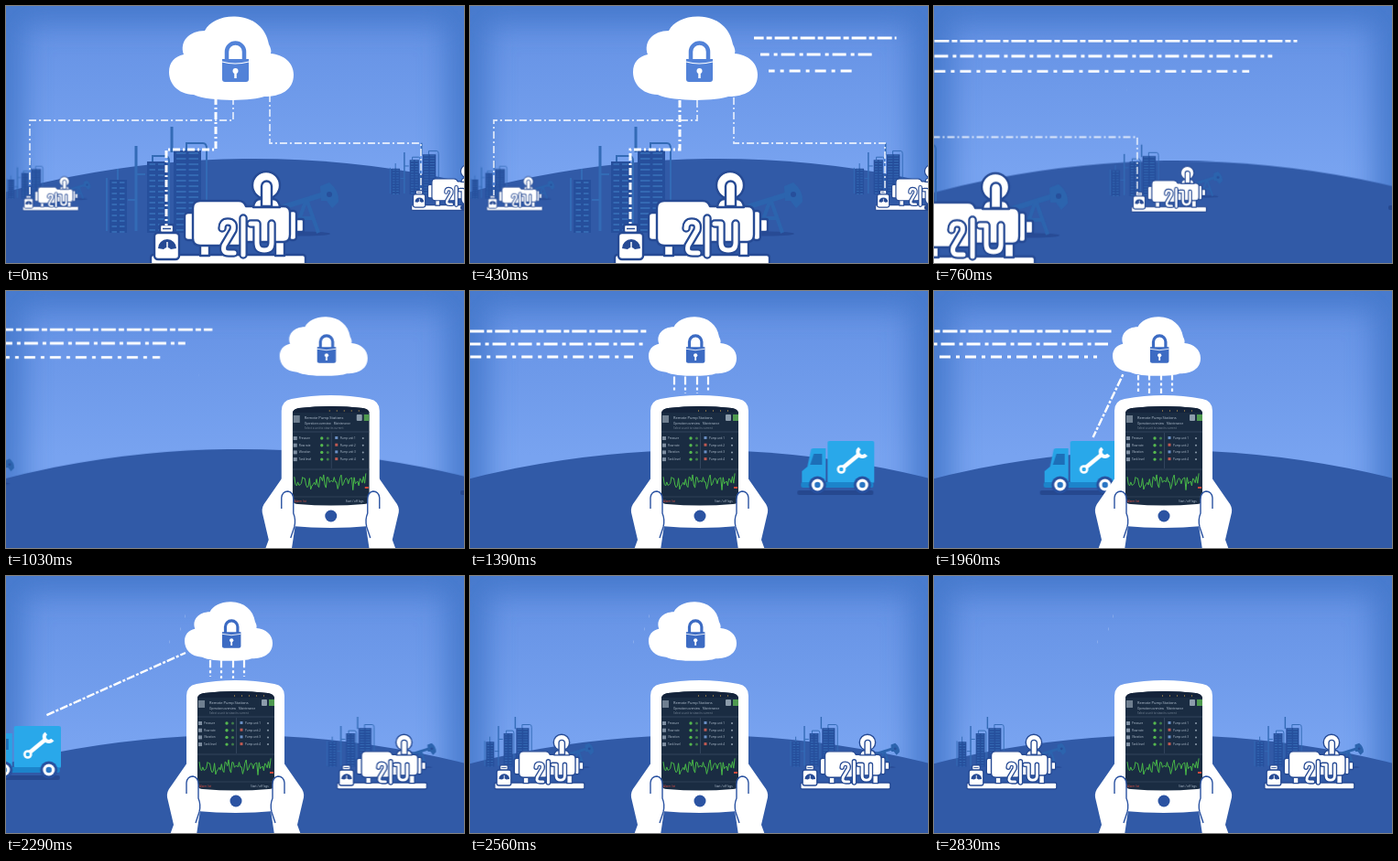
Animation, 500 px wide and 281 px high, one loop 2860 ms. Source, as an HTML page:

```html
<!DOCTYPE html>
<html lang="en">
<head>
<meta charset="utf-8">
<title>Connected pumps</title>
<style>
html, body { margin: 0; width: 100%; height: 100%; overflow: hidden; background: #5585db; }
svg { display: block; width: 100%; height: 100%; }
text { font-family: "Open Sans", Arial, sans-serif; fill: #b9c7d6; font-size: 3px; }

.pan, .arrive, .truck, .lift, .site-r, .site-l,
.wire, .data, .rain, .call { animation: 2860ms linear infinite; }

/* camera pan: layers share one ease and differ in distance */
.pan { animation-name: pan; }
.near { --shift: -613px, 5px; }
.mid { --shift: -642px, 5px; }
.cloud-a { --shift: -955px, 0px; }
.hill { --shift: -20px, 7px; }
.arrive { animation-name: arrive; }
@keyframes pan {
  0%, 15.38% { transform: translate(0px, 0px); animation-timing-function: cubic-bezier(.333,0,.667,1); }
  43.36%, 100% { transform: translate(var(--shift)); }
}
@keyframes arrive {
  0%, 15.38% { transform: translateX(613px); animation-timing-function: cubic-bezier(.333,0,.667,1); }
  43.36%, 100% { transform: none; }
}

/* dashed links from the sites to the cloud */
.wire, .data, .rain, .call { fill: none; stroke: #fff; }
.wire { stroke-width: 1.8; stroke-dasharray: 8 3 2 3; opacity: .75; }
.w1 { animation-name: w1, flow-up; }
.w2 { animation-name: w2, flow-up; stroke-width: 3; opacity: 1; }
.w3 { animation-name: w3, flow-up; }
@keyframes flow-up { to { stroke-dashoffset: 192px; } }
@keyframes w1 {
  0%, 15.38% { d: path("M248 100V125H26V207"); animation-timing-function: cubic-bezier(.333,0,.667,1); }
  43.36%, 100% { d: path("M-94 100V125H26V207"); }
}
@keyframes w2 {
  0%, 15.38% { d: path("M229 100V157H175V240"); animation-timing-function: cubic-bezier(.333,0,.667,1); }
  43.36%, 100% { d: path("M-113 100V157H175V240"); }
}
@keyframes w3 {
  0%, 15.38% { d: path("M288 97V150H453V204"); animation-timing-function: cubic-bezier(.333,0,.667,1); }
  43.36%, 100% { d: path("M-25 97V126H442V204"); }
}

/* data streams between the two clouds */
.data { stroke-width: 2.8; }
.d1 { animation-name: d1, flow; stroke-dasharray: 16 3 6 3; }
.d2 { animation-name: d2, flow; stroke-dasharray: 15 5 4 4; }
.d3 { animation-name: d3, flow; stroke-dasharray: 12 6 4 6; }
@keyframes flow { to { stroke-dashoffset: -336px; } }
@keyframes d1 {
  0%, 2.94% { d: path("M310 35H310"); }
  15.38% { d: path("M310 35H469.5"); }
  24% { d: path("M100 36H580"); }
  41.78% { d: path("M100 39H808"); }
  69.93% { d: path("M613 39H808"); }
  76.92%, 100% { d: path("M808 39H808"); }
}
@keyframes d2 {
  0%, 5.17% { d: path("M317 53H317"); }
  15.38% { d: path("M317 53H445"); }
  24% { d: path("M100 53H553.5"); }
  43.85% { d: path("M100 53H803"); }
  69.93% { d: path("M613 53H803"); }
  76.92%, 100% { d: path("M803 53H803"); }
}
@keyframes d3 {
  0%, 7.48% { d: path("M326 71H326"); }
  15.38% { d: path("M326 71H423"); }
  24% { d: path("M100 70H529"); }
  45.28% { d: path("M100 67H791"); }
  69.93% { d: path("M613 67H791"); }
  76.92%, 100% { d: path("M791 67H791"); }
}

/* cloud to tablet */
.rain { animation-name: rain, flow; stroke-width: 2.2; stroke-dasharray: 9 3 3 3; }
@keyframes rain {
  0%, 44.5% { d: path("M223 92V92M235 92V92M248 92V92M260 92V92"); }
  48.5%, 83.92% { d: path("M223 92V110M235 92V112M248 92V112M260 92V110"); }
  88.11%, 100% { d: path("M223 110V110M235 112V112M248 112V112M260 110V110"); }
}
.lift { animation-name: lift; }
@keyframes lift {
  0%, 89.51% { transform: none; animation-timing-function: cubic-bezier(.333,0,.667,.333); }
  98.95%, 100% { transform: translateY(-96px); }
}

/* service truck and its link */
.truck { animation-name: drive; }
@keyframes drive {
  0%, 37.2% { transform: translateX(500px); }
  85.03%, 100% { transform: translateX(-80px); }
}
.call { animation-name: call, flow; stroke-width: 2.4; stroke-dasharray: 9 2 3 2; }
@keyframes call {
  0%, 64.69% { d: path("M210 92L210 92"); }
  67.48% { d: path("M208 91L186 161"); }
  68.53% { d: path("M207 90L174 160"); }
  80.07% { d: path("M196 84L43 153"); }
  84.97% { d: path("M190 81L-13 150"); }
  87%, 100% { d: path("M-13 150L-13 150"); }
}

/* closing pair of sites */
.site-r { animation-name: site-r; }
.site-l { animation-name: site-l; }
@keyframes site-r {
  0%, 72.73% { transform: translateX(165px); animation-timing-function: cubic-bezier(.2,.7,.3,1); }
  81.12%, 100% { transform: none; }
}
@keyframes site-l {
  0%, 84.62% { transform: translateX(-165px); animation-timing-function: cubic-bezier(.2,.7,.3,1); }
  93.01%, 100% { transform: none; }
}
</style>
</head>
<body>
<svg viewBox="0 0 500 281" preserveAspectRatio="none">
  <defs>
    <linearGradient id="sky" gradientUnits="userSpaceOnUse" x1="0" y1="0" x2="0" y2="180">
      <stop offset="0" stop-color="#6390e3"/>
      <stop offset="1" stop-color="#78a3f0"/>
    </linearGradient>
    <filter id="soft" x="-.2" y="-.2" width="1.4" height="1.4"><feGaussianBlur stdDeviation="15"/></filter>

    <g id="cloud">
      <path fill="#fff" d="M205 97C187 96 178 85 178 72C178 62 184 55 194 53C189 39 200 27 217 27C222 17 235 11 250 11.500C270 12 284 24 287 42C289 46 290 49 289 52C303 53 314 62 314 75C314 92 300 99 282 99C270 104 222 105 205 97Z"/>
      <g fill="currentColor">
        <path fill="none" stroke="currentColor" stroke-width="4.500" d="M241 59V50a9.500 9.500 0 0 1 19 0V59"/>
        <path d="M236 58H265V80Q265 83 262 83H239Q236 83 236 80Z"/>
      </g>
      <path fill="none" stroke="#fff" stroke-width="1.200" d="M236 61Q250 65 265 61"/>
      <circle cx="250.500" cy="71" r="3" fill="#fff"/>
      <path stroke="#fff" stroke-width="2.500" d="M250.500 72V79"/>
    </g>

    <g id="plant">
      <ellipse cx="325" cy="249" rx="29" ry="2.500" fill="#284b95"/>
      <g fill="none" stroke="#336bb6" stroke-width="2">
        <path stroke-width="3" d="M181 132V160M142 153V246"/>
        <path d="M122 178V192M110 188V246"/>
        <path d="M197 158V150H215Q219 150 219 156V246M160 170V164H174Q178 164 178 170V246M143 184H152M133 212H143"/>
      </g>
      <path fill="#264f9c" d="M183 158H213V248H183ZM154 170H175V248H154ZM113 190H132V248H113Z"/>
      <g fill="none" stroke="#3469b3" stroke-dasharray="2 4">
        <path stroke-width="24" d="M198 160V248"/>
        <path stroke-width="16" d="M164.500 172V248"/>
        <path stroke-width="14" d="M122.500 192V248"/>
      </g>
      <path stroke="#264f9c" stroke-width="3" d="M198 158V248M164.500 170V248M122.500 190V248"/>
      <g fill="none" stroke="#2c64ae" stroke-linejoin="round">
        <path stroke-width="6" d="M302 220L350 205"/>
        <path stroke-width="4" d="M328 211L315 248M328 211L341 248M321 232H336"/>
      </g>
      <path fill="#2c64ae" d="M343 197L353 193Q364 202 363 214L356 221L350 213H344Z"/>
      <circle cx="353" cy="206" r="3" fill="#274f9b"/>
    </g>

    <g id="pump" fill="#fff" stroke="#264a94" stroke-width="2.400" stroke-linejoin="round">
      <rect x="158" y="272" width="169" height="12" rx="3"/>
      <path d="M212 256H222V273H212ZM294 256H304V273H294Z"/>
      <rect x="168" y="239" width="15" height="9" rx="2"/>
      <path fill="none" stroke-width="1.500" d="M171 243.500H180"/>
      <rect x="162" y="248" width="27" height="29" rx="4"/>
      <path fill="#264a94" stroke="none" d="M166 265A10 10 0 0 1 186 265L180 266Q176 262 172 266Z"/>
      <path stroke="#fff" stroke-width="1.500" d="M176 265V258"/>
      <rect x="316" y="233" width="9" height="14" rx="2"/>
      <rect x="309" y="224" width="8" height="32" rx="3"/>
      <rect x="195" y="226" width="14" height="30" rx="4"/>
      <path d="M212 213H254Q260 213 262 219H303Q310 219 310 226V250Q310 258 303 258H262Q258 262 252 262H212Q204 262 204 254V221Q204 213 212 213Z"/>
      <circle cx="284" cy="196" r="15"/>
      <path d="M270 220Q271 211 278 211H291Q298 211 299 220Z"/>
      <path d="M279 219V197a5.500 5.500 0 0 1 11 0V219Z"/>
      <g fill="none" stroke-linecap="round">
        <path id="pipes" stroke-width="9.500" d="M236 243Q236 236 242 236Q250 236 248 245L238 262Q236 270 243 270H249M259 232V272M267 238H274V259Q274 267 282 267Q290 267 290 259V238"/>
        <path stroke="#fff" stroke-width="5" d="M236 243Q236 236 242 236Q250 236 248 245L238 262Q236 270 243 270H249M259 232V272M267 238H274V259Q274 267 282 267Q290 267 290 259V238"/>
      </g>
    </g>

    <g id="site"><use href="#plant"/><use href="#pump"/></g>
    <g id="far-site">
      <use href="#plant" transform="translate(-26.700 92) scale(.47)"/>
      <use href="#pump" transform="translate(-55.800 68.300) scale(.58)"/>
    </g>

    <g id="hand">
      <path fill="#fff" d="M198 204L180 230Q175 236 176 242L183 272L179 283H208L212 256Z"/>
      <path fill="#fff" stroke="#2b53a2" stroke-width="1.400" d="M197 238V226Q198 219 204 219Q210 220 210 228V243Q213 250 211 258L207 270"/>
    </g>

    <clipPath id="glass"><path d="M209 133Q210 129 216 128Q251 124 286 128Q292 129 293 133V229Q292 233 287 233Q251 236 215 233Q210 233 209 229Z"/></clipPath>
  </defs>

  <rect width="500" height="281" fill="url(#sky)"/>
  <rect x="-5" y="-5" width="510" height="291" fill="none" stroke="#3f74c8" stroke-width="50" opacity=".8" filter="url(#soft)"/>
  <g class="pan hill"><circle cx="271" cy="1197" r="1030" fill="#315aa7"/></g>

  <g class="site-l"><use href="#far-site"/></g>
  <g class="site-r"><use href="#far-site" x="325"/></g>

  <g class="pan mid">
    <use href="#site" transform="translate(366 85.700) scale(.485)"/>
    <path class="wire w3"/>
  </g>
  <g class="pan near">
    <use href="#site" transform="translate(-38.600 121.300) scale(.36)"/>
    <use href="#site"/>
    <path class="wire w1"/>
    <path class="wire w2"/>
    <path class="data d1"/>
    <path class="data d2"/>
    <path class="data d3"/>
  </g>
  <g class="pan cloud-a" color="#5282d8"><use href="#cloud"/></g>

  <g class="truck">
    <rect x="-4" y="218" width="83" height="5" rx="2" fill="#26488f"/>
    <path fill="#27a4e6" d="M11 173Q12 172 14 172H27V212H1V197L7 192Z"/>
    <path fill="#1d6fb8" d="M14 178H23V190H10Z"/>
    <rect x="29" y="164" width="51" height="46" rx="2" fill="#29a8ea"/>
    <rect x="0" y="209" width="79" height="6" rx="2" fill="#1c84cb"/>
    <g stroke="#fff" fill="none">
      <path stroke-width="4.500" d="M46 193L63 179"/>
      <circle cx="44" cy="195" r="3.500" stroke-width="2.600"/>
      <path stroke-width="4" d="M64 172A5 5 0 1 0 71 179"/>
    </g>
    <g id="wheel">
      <circle cx="18" cy="212" r="9.500" fill="#27509f"/>
      <circle cx="18" cy="212" r="6.500" fill="#fff"/>
      <circle cx="18" cy="212" r="3.200" fill="#2a76c4"/>
    </g>
    <use href="#wheel" x="49"/>
  </g>

  <path class="call"/>

  <g class="arrive">
    <path class="rain"/>
    <g class="lift" color="#3c6bc3"><use href="#cloud" transform="translate(69.300 20.200) scale(.706)"/></g>
    <path fill="#fff" d="M197 131Q197 120 208 118Q251 110 293 118Q304 120 304 131V248Q303 256 293 257Q251 261 208 257Q198 256 197 248Z"/>
    <g clip-path="url(#glass)">
      <rect x="208" y="124" width="86" height="112" fill="#1a2c42"/>
      <rect x="208" y="124" width="86" height="9" fill="#14233a"/>
      <path stroke="#e0b050" stroke-width="1" stroke-dasharray="1 7" d="M249 131H285"/>
      <rect x="210" y="136" width="7" height="8" fill="#6f7f90"/>
      <rect x="279" y="135" width="6" height="7" rx="1" fill="#8c9cab"/>
      <rect x="287" y="135" width="6" height="7" fill="#4f9a50"/>
      <text x="222" y="140" style="font-size:4px">Remote Pump Stations</text>
      <text x="222" y="146">Operations overview</text>
      <text x="254" y="146">Maintenance</text>
      <text x="222" y="151" opacity=".6">Select a unit to view its current</text>
      <g id="rows"></g>
      <path stroke="#3d5067" stroke-width=".7" d="M209 154H293M251.500 155V194M209 195H293"/>
      <path id="chart" fill="none" stroke="#48b848" stroke-width="1" stroke-linejoin="round"/>
      <path stroke="#3d5067" stroke-width=".6" d="M209 225H293"/>
      <rect x="288" y="214" width="4" height="2" fill="#d34a3c"/>
      <text x="211" y="231" style="fill:#e05045">Alarm list</text>
      <text x="267" y="231">Start / off logs</text>
    </g>
    <circle cx="251" cy="246" r="6.500" fill="#2b53a2"/>
    <use href="#hand"/>
    <use href="#hand" transform="translate(501 0) scale(-1 1)"/>
  </g>
</svg>
<script>
const row = (label, i) => {
  const y = 162 + i * 7.7;
  return `<rect x="210" y="${y - 3}" width="4" height="4" fill="#7d8da0"/>
    <text x="216" y="${y}">${label}</text>
    <circle cx="241" cy="${y - 1}" r="1.7" fill="#55b84f"/>
    <circle cx="247.5" cy="${y - 1}" r="1.5" fill="#3f7d4a"/>
    <rect x="255.5" y="${y - 3}" width="3" height="3" fill="${i % 2 ? '#c05a52' : '#6a8fc4'}"/>
    <text x="261" y="${y}">Pump unit ${i + 1}</text>
    <circle cx="286" cy="${y - 1}" r="1" fill="#8b9bab"/>`;
};
document.getElementById('rows').innerHTML =
  ['Pressure', 'Flow rate', 'Vibration', 'Tank level'].map(row).join('');

// seeded noise for the trend line
let seed = 17;
const rand = () => (seed = seed * 16807 % 2147483647) / 2147483647;
const points = Array.from({ length: 62 }, (_, i) => {
  const swing = rand() < .3 ? 20 : 10;
  return `${(211 + i * 1.28).toFixed(1)} ${(208.5 + (rand() - .5) * swing).toFixed(1)}`;
});
document.getElementById('chart').setAttribute('d', 'M' + points.join('L'));
</script>
</body>
</html>
```
